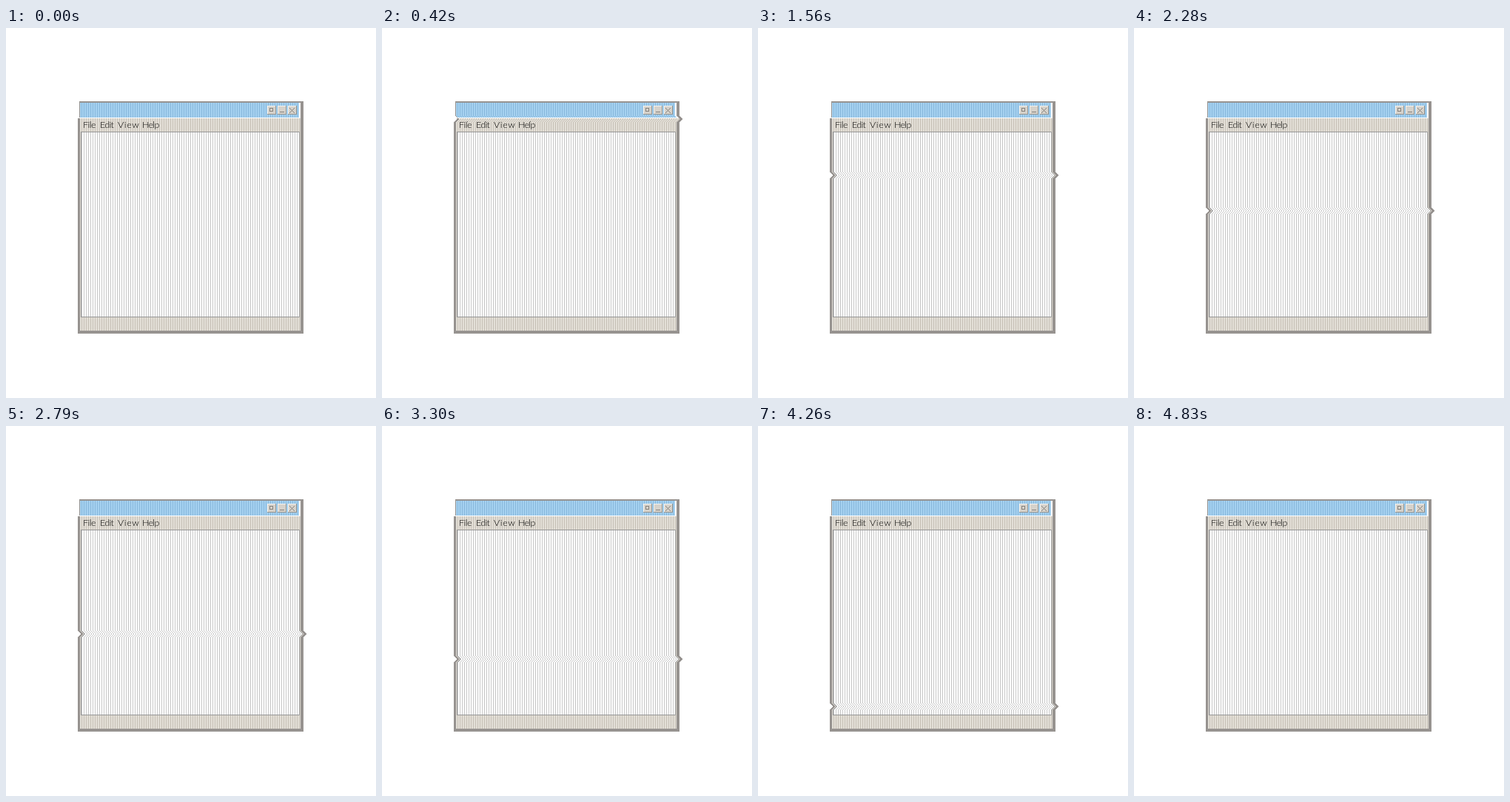
Write an HTML page with a canvas that moves like this. It is 500 px wide and 500 px high and loops after 4.86 s.

```html
<!DOCTYPE html>
<html>
<head>
<meta charset="utf-8">
<style>
  html, body { margin: 0; height: 100%; overflow: hidden; background: #fff; }
  canvas { display: block; }
</style>
</head>
<body>
<canvas id="stage" width="500" height="500"></canvas>
<script>
const STEP = 30, STEPS = 162;
const SHIFTS = [1, 2, 3, 4, 4, 3, 2, 1];

const stage = document.getElementById('stage').getContext('2d');
const desktop = document.createElement('canvas');
desktop.width = desktop.height = 500;
const g = desktop.getContext('2d');

function box(x, y, w, h, color) {
  g.fillStyle = color;
  g.fillRect(x, y, w, h);
}

// One darker column in every three
function stripes(x, y, w, h, base, line) {
  box(x, y, w, h, base);
  for (let i = Math.ceil(x / 3) * 3; i < x + w; i += 3) box(i, y, 1, h, line);
}

function button(x, y) {
  box(x, y, 12, 12, '#9a9791');
  box(x, y, 11, 11, '#f4f1ec');
  box(x + 1, y + 1, 10, 10, '#d6d2cb');
}

function label(text, x, spacing) {
  g.font = '300 12.5px Lato, sans-serif';
  g.letterSpacing = spacing + 'px';
  g.fillStyle = '#000';
  g.fillText(text, x, 135);
}

function drawWindow() {
  const edge = '#979390', glyph = '#85817c';
  box(0, 0, 500, 500, '#fff');
  box(99, 99, 303, 24, edge);
  box(97, 122, 305, 291, edge);
  stripes(100, 101, 296, 20, '#a5d1f0', '#88b8dc');
  box(396, 101, 2, 21, '#fff');
  box(99, 121, 299, 1, '#fff');
  stripes(100, 122, 298, 287, '#e3dfd7', '#c6c0b6');
  box(101, 140, 296, 251, '#979797');
  stripes(102, 141, 294, 249, '#fff', '#c6c6c6');

  for (const x of [353, 367, 381]) button(x, 105);
  g.strokeStyle = glyph;
  g.strokeRect(356.5, 108.5, 4, 4);
  box(370, 113, 6, 1, glyph);
  for (let i = 0; i < 7; i++) {
    box(383 + i, 108 + i, 1, 1, glyph);
    box(389 - i, 108 + i, 1, 1, glyph);
  }

  label('File', 104, -0.5);
  label('Edit', 127, -0.7);
  label('View', 151, 0.6);
  label('Help', 184, -0.7);
}

// A band of rows pushed sideways travels down the screen
function draw() {
  const step = Math.floor(performance.now() / STEP) % STEPS;
  const top = 91 + 2 * step;
  stage.drawImage(desktop, 0, 0);
  SHIFTS.forEach((shift, i) => {
    stage.drawImage(desktop, 0, top + i, 500, 1, shift, top + i, 500, 1);
  });
  requestAnimationFrame(draw);
}

drawWindow();
draw();
</script>
</body>
</html>
```
